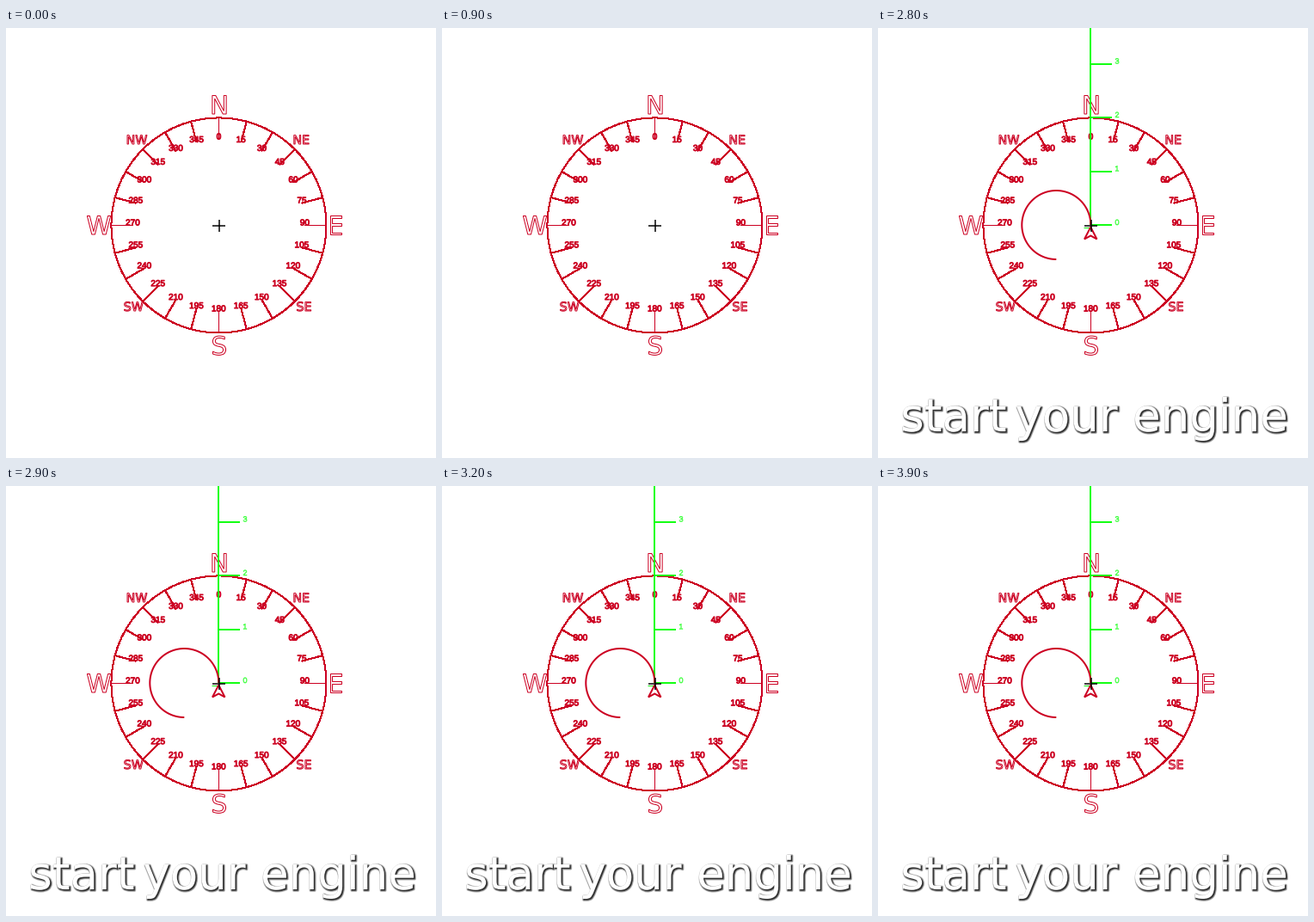
Recreate the animation shown at these times as a matplotlib script. Size 500 by 500 pixels, loop 5.6 s.

```python
import numpy as np
import matplotlib.pyplot as plt
from matplotlib.animation import FuncAnimation
from matplotlib.patches import Circle, PathPatch, Polygon
from matplotlib.textpath import TextPath
from matplotlib.transforms import Affine2D

SIZE, DPI = 500, 100
PX = 72 / DPI                     # points per pixel
STEP_MS, FRAMES = 100, 56
TITLE_START, COURSE_START = 27, 28
CX, CY, RADIUS = 247.45, 229.45, 125
RED, GREEN = "#cc0022", "#14ff14"

fig = plt.figure(figsize=(SIZE / DPI, SIZE / DPI), dpi=DPI, facecolor="white")
ax = fig.add_axes([0, 0, 1, 1])
ax.set_xlim(0, SIZE)
ax.set_ylim(SIZE, 0)
ax.axis("off")


def line(xs, ys, color, width, z, smooth=True):
    return ax.plot(xs, ys, color=color, lw=width * PX, zorder=z,
                   antialiased=smooth, solid_capstyle="butt",
                   solid_joinstyle="miter")[0]


def glyphs(text, x, baseline, size, family, align="center"):
    """Outline of a text with its ink centred on x, or starting at x."""
    path = TextPath((0, 0), text, size=size, prop={"family": [family]})
    box = path.get_extents()
    anchor = (box.x0 + box.x1) / 2 if align == "center" else box.x0
    return path.transformed(
        Affine2D().translate(-anchor, 0).scale(1, -1).translate(x, baseline))


def outlined(text, x, baseline, size, color, width, z,
             family="DejaVu Sans"):
    return ax.add_patch(PathPatch(glyphs(text, x, baseline, size, family),
                                  fill=False, ec=color, lw=width * PX,
                                  zorder=z))


def polar(deg, r):
    a = np.radians(deg)
    return CX + r * np.sin(a), CY - r * np.cos(a)


def draw_compass():
    ax.add_patch(Circle((CX, CY), RADIUS, fill=False, ec=RED, lw=PX,
                        antialiased=False, zorder=1))
    for deg in range(0, 360, 15):
        (x0, y0), (x1, y1) = polar(deg, RADIUS), polar(deg, 100)
        line([x0, x1], [y0, y1], RED, 1, 1, smooth=False)
        outlined(str(deg), x1, y1, 10, RED, 1, 1, "Liberation Sans")
    for name, x, y in [("N", 248, 100), ("E", 383.5, 240),
                       ("S", 248, 380), ("W", 108, 240)]:
        outlined(name, x, y, 29.5, RED, 1, 1)
    for name, x, y in [("NE", 343.5, 135), ("SE", 346.5, 329),
                       ("SW", 148.5, 329), ("NW", 152.5, 135)]:
        outlined(name, x, y, 14.3, RED, 1, 1)
    line([240, 255], [230, 230], "black", 1.5, 5)
    line([247.5, 247.5], [223, 237], "black", 1.5, 5)


def draw_title():
    parts = []
    for word, x in [("start", 29), ("your", 161), ("engine", 299)]:
        path = glyphs(word, x, 469, 53, "DejaVu Sans", "left")
        shadow = path.transformed(Affine2D().translate(1.2, 1.2))
        parts += [PathPatch(shadow, fc="black", ec="black", alpha=0.18,
                            lw=w * PX, zorder=6, joinstyle="round")
                  for w in (3.6, 2.7, 1.9, 1.1, 0.4)]
        parts.append(PathPatch(path, fc="white", lw=0, zorder=7))
    return [ax.add_patch(p) for p in parts]


def draw_course():
    parts = [line([247, 247], [0, 229], GREEN, 2, 2),
             line([239, 247], [232, 232], GREEN, 1, 2)]
    for n in range(4):
        y = 229 - 62.5 * n
        parts.append(line([247, 272], [y, y], GREEN, 2, 2))
        parts.append(outlined(str(n), 278, y, 9, GREEN, 0.5, 2,
                              "Liberation Sans"))
    sweep = np.radians(np.linspace(0, 270, 120))
    parts.append(line(207.3 + 40 * np.cos(sweep), 229 - 40 * np.sin(sweep),
                      RED, 2, 3))
    arrow = Polygon([(247.3, 231.5), (254.5, 245.5), (247.3, 241.5),
                     (240, 245.5)],
                    fill=False, ec=RED, lw=2 * PX, zorder=4)
    parts.append(ax.add_patch(arrow))
    return parts


draw_compass()
title = draw_title()
course = draw_course()


def update(i):
    for part in title:
        part.set_visible(i >= TITLE_START)
    for part in course:
        part.set_visible(i >= COURSE_START)
    return title + course


anim = FuncAnimation(fig, update, frames=FRAMES, interval=STEP_MS,
                     repeat=True, repeat_delay=0, blit=False)
plt.show()
```
